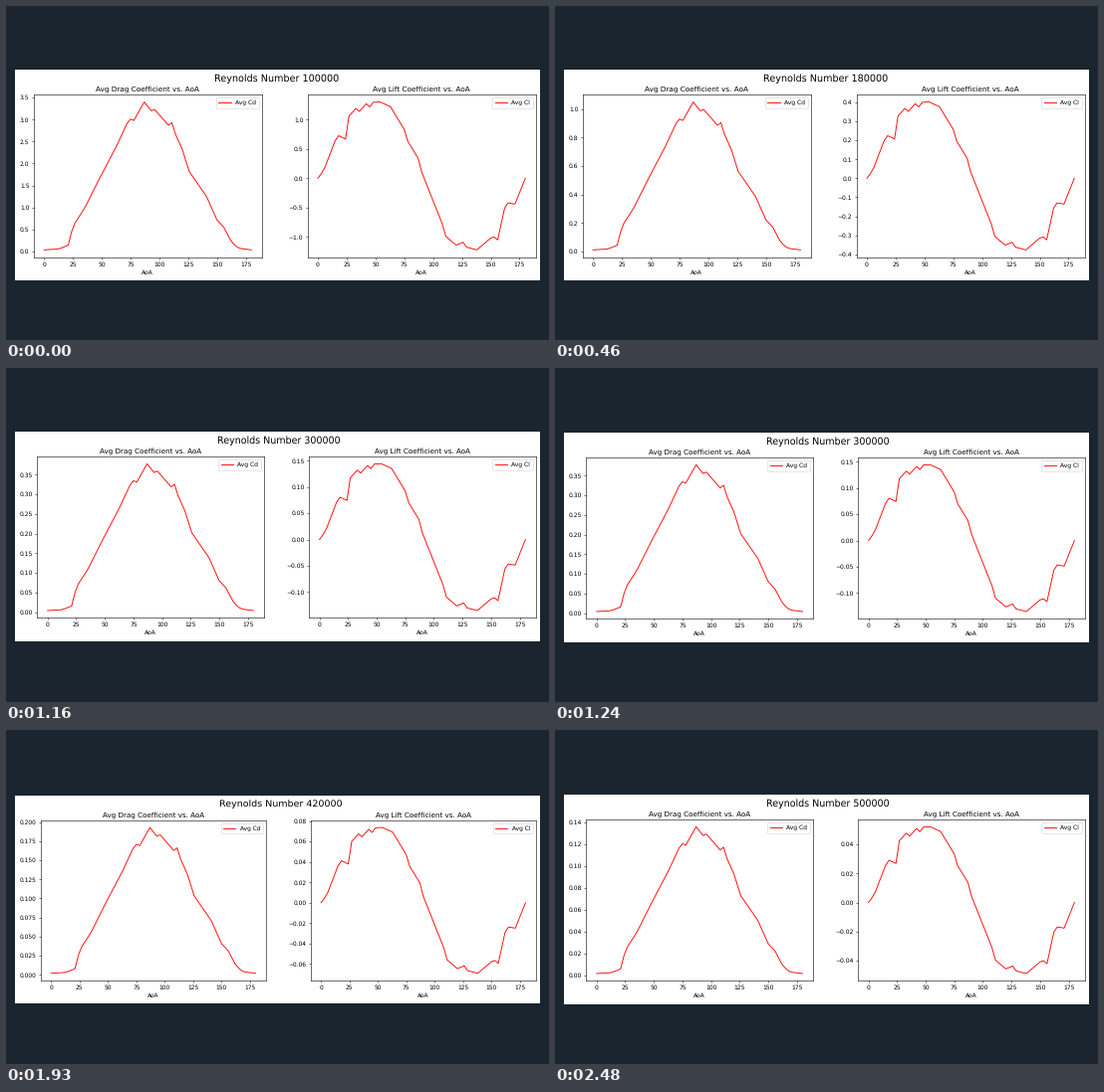
A matplotlib script for the animation above (2560 ms loop, 545 px wide and 336 px high).

```python
import math

import numpy as np
import matplotlib.pyplot as plt
from matplotlib.animation import FuncAnimation
from matplotlib.patches import Rectangle
from matplotlib.ticker import MaxNLocator

W, H, DPI = 545, 336, 64
LOOP, TICK = 2560, 10
PANEL_X, PANEL_W = 9, 527

# Each chart's start in ms; the Reynolds number grows by 40000 per chart
STARTS = (0, 230, 460, 770, 930, 1160, 1470, 1700, 1930, 2160, 2480)
# Charts whose panel keeps the previous top edge for some ms before centring
SETTLE = {5: 80, 9: 90}

# Turning points (angle, coefficient) at Re = 100000
DRAG_KEYS = [
    (0, .035), (13, .055), (21, .14), (24, .45), (27, .65), (35, .97),
    (48, 1.65), (63, 2.4), (74, 3.02), (78, 2.98), (87, 3.4), (93, 3.2),
    (96, 3.23), (108, 2.87), (111, 2.93), (114, 2.67), (120, 2.32),
    (126, 1.82), (141, 1.25), (150, .72), (156, .55), (163, .2), (169, .07),
    (180, .035)]
LIFT_KEYS = [
    (0, 0), (5, .13), (15, .64), (18, .725), (24, .67), (27, 1.06),
    (33, 1.19), (36, 1.14), (42, 1.27), (45, 1.215), (48, 1.295), (54, 1.3),
    (63, 1.22), (75, .83), (78, .63), (87, .34), (90, .11), (108, -.78),
    (111, -.99), (120, -1.14), (126, -1.09), (129, -1.175), (138, -1.22),
    (152, -.985), (156, -1.05), (162, -.51), (165, -.42), (171, -.44),
    (180, 0)]
ANGLE = np.arange(0, 181, 3)
DRAG, LIFT = (np.interp(ANGLE, *zip(*keys)) for keys in (DRAG_KEYS, LIFT_KEYS))

# Sizes in points of the full-size chart, which is then scaled to the panel width
STYLE = {
    "font.size": 10, "axes.titlesize": 12, "axes.titlepad": 6,
    "axes.labelpad": 4, "axes.linewidth": 0.95, "lines.linewidth": 1.5,
    "patch.linewidth": 1,
    "xtick.major.size": 3.5, "xtick.major.pad": 3.5, "xtick.major.width": 0.9,
    "ytick.major.size": 3.5, "ytick.major.pad": 3.5, "ytick.major.width": 0.9,
}
MARGIN, AXES_SPAN = 7.2, 837
AXES_W, AXES_H, AXES_TOP = AXES_SPAN / 2.2, 271.8, 41.7

plt.rcParams["font.family"] = "DejaVu Sans"
plt.rcParams["text.hinting"] = "none"
fig = plt.figure(figsize=(W / DPI, H / DPI), dpi=DPI, facecolor="#1b252f")
shown = None


def reynolds(i):
    return 100000 + 40000 * i


def falloff(i):
    return (reynolds(0) / reynolds(i)) ** 2


def drag_decimals(i):
    """Decimals in the drag tick labels, which set the left margin."""
    drag = DRAG * falloff(i)
    pad = 0.05 * np.ptp(drag)
    locator = MaxNLocator(9, steps=[1, 2, 2.5, 5, 10])
    ticks = locator.tick_values(drag.min() - pad, drag.max() + pad)
    return len(f"{ticks[1] - ticks[0]:.6g}") - len("0.")


def box(x, top, w, h):
    """Pixel box measured from the top left, as figure fractions."""
    return x / W, 1 - (top + h) / H, w / W, h / H


def add_chart(rect, values, kind, label):
    ax = fig.add_axes(rect)
    ax.plot(ANGLE, values, color="red", label=label)
    ax.set_title(f"Avg {kind} Coefficient vs. AoA", y=1)
    ax.set_xlabel("AoA")
    ax.legend(loc="upper right")


def build(i, settling):
    decimals = drag_decimals(i)
    left = MARGIN + 17.5 + 6.36 * decimals
    scale = PANEL_W / (left + AXES_SPAN + MARGIN)
    points = scale * 72 / DPI
    plt.rcParams.update({key: size * points for key, size in STYLE.items()})

    fig.clear()
    top = 63 + (drag_decimals(i - 1) if settling else decimals)
    x, y, w, h = box(PANEL_X, top, PANEL_W, math.ceil(351.5 * scale))
    fig.add_artist(Rectangle((x, y), w, h, transform=fig.transFigure,
                             facecolor="white", linewidth=0, zorder=-1))

    x0 = PANEL_X + left * scale
    fig.text((x0 + 405 * scale) / W, 1 - (top + MARGIN * scale) / H,
             f"Reynolds Number {reynolds(i)}", size=16 * points,
             ha="center", va="top")
    charts = [(DRAG, "Drag", "Avg Cd"), (LIFT, "Lift", "Avg Cl")]
    for col, (values, kind, label) in enumerate(charts):
        rect = box(x0 + 1.2 * AXES_W * col * scale, top + AXES_TOP * scale,
                   AXES_W * scale, AXES_H * scale)
        add_chart(rect, values * falloff(i), kind, label)


def update(frame):
    global shown
    now = frame * TICK
    i = sum(start <= now for start in STARTS) - 1
    state = i, now - STARTS[i] < SETTLE.get(i, 0)
    if state != shown:
        build(*state)
        shown = state
    return []


anim = FuncAnimation(fig, update, frames=LOOP // TICK, interval=TICK,
                     repeat=True, repeat_delay=0, blit=False)
plt.show()
```
